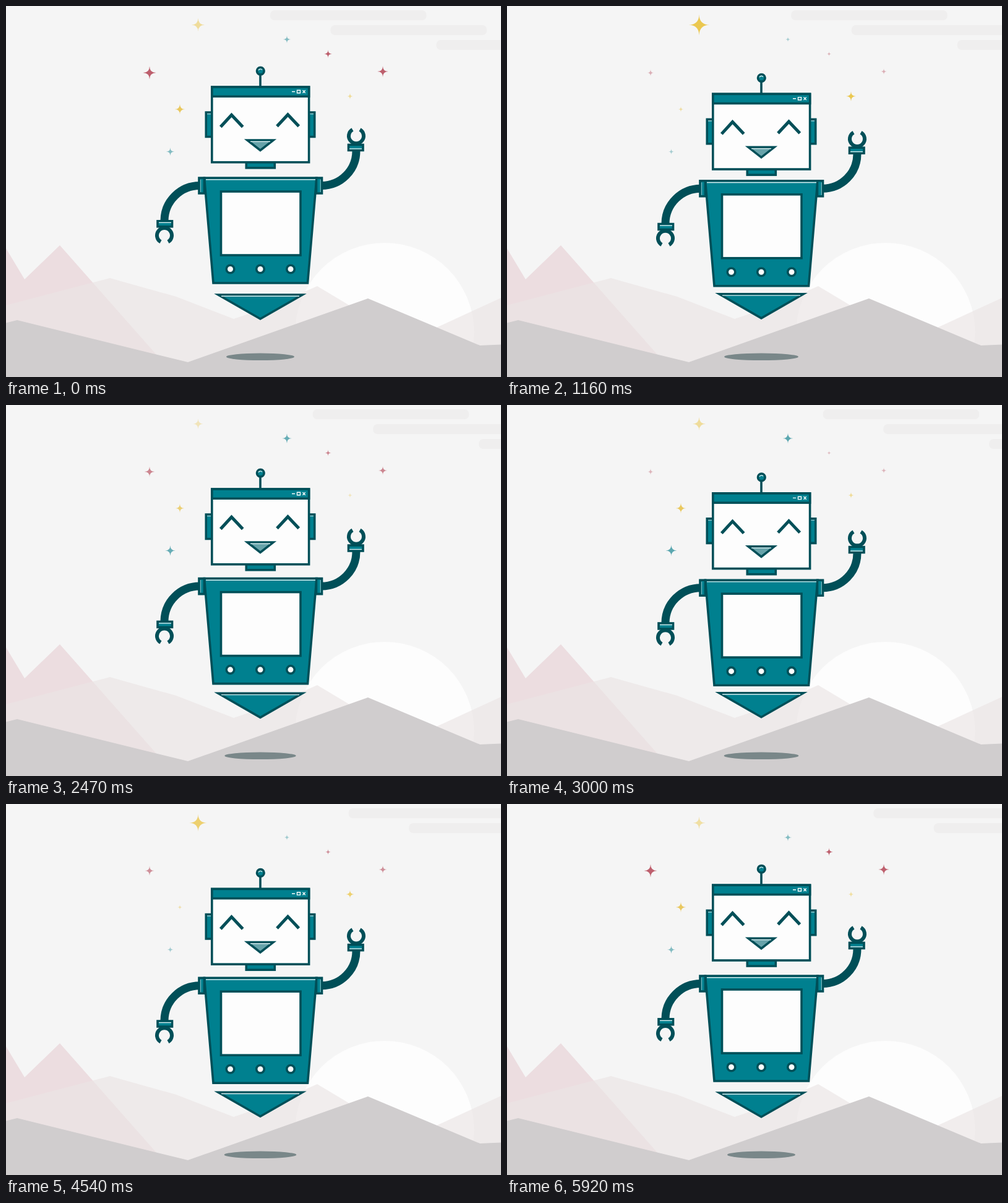
Recreate the animation shown at these times as an HTML page. Size 800x600 px, loop 6 s.

```html
<!DOCTYPE html>
<html lang="en">
<head>
<meta charset="utf-8">
<title>Happy robot</title>
<style>
  html, body { margin: 0; width: 100%; height: 100%; overflow: hidden; background: #f5f5f5; }
  svg { display: block; width: 100%; height: 100%; }
  .line { stroke: #004f58; stroke-width: 3.6; stroke-miterlimit: 10; }
  .teal { fill: #00808f; }
  .white { fill: #fdfdfd; }
  .bare { fill: none; }
  .dark { fill: #004f58; }
  .shine { fill: none; stroke: #d9eef0; stroke-width: 1.4; }
  .icon { fill: none; stroke: #fff; stroke-width: 1.4; }
</style>
</head>
<body>
<svg viewBox="0 0 800 600">
  <g id="clouds" fill="#efeeee">
    <rect x="427" y="7" width="252.500" height="16" rx="7"/>
    <rect x="524.500" y="31" width="252.500" height="16" rx="7"/>
    <rect x="695.500" y="55" width="252.500" height="16" rx="7"/>
  </g>
  <g id="stars"></g>

  <path fill="#ecdde0" d="M0 392 30 442 87 387 275 600H0Z"/>
  <circle cx="612" cy="527.500" r="144.500" fill="#fdfdfd"/>
  <path fill="#ece6e6" fill-opacity=".66" d="M0 484 168 440 275 470 368 506 435 483 503 453 650 541 698 519 800 472V600H0Z"/>
  <path fill="#d0cdce" d="M0 512.500 18 508 294 576 585 473 766 549 800 547.500V600H0Z"/>

  <ellipse id="shadow" cx="411" cy="567.300" ry="5.800" fill="#798789"/>

  <g id="tail">
    <path class="line teal" d="M343 467H479L411 506Z"/>
    <path class="shine" d="M348 469.300H474"/>
  </g>

  <g id="body">
    <g class="bare" stroke="#004f58" stroke-width="13">
      <path d="M313 290.500A57 57 0 0 0 256 347"/>
      <path d="M510 290.500A56 56 0 0 0 566 234"/>
    </g>
    <g id="hand">
      <rect class="line teal" x="245" y="347.800" width="23.500" height="9"/>
      <path class="shine" d="M247 350.300H267"/>
      <path class="bare" stroke="#004f58" stroke-width="6" d="M250 381.400A12 12 0 1 1 262 381.400"/>
    </g>
    <use href="#hand" transform="rotate(180 411 290.600)"/>
    <path class="line teal" d="M320.500 278H502L487.500 448H335Z"/>
    <path class="line teal" d="M312 278H320.500V303H312ZM501.500 278H510.500V303H501.500Z"/>
    <path class="shine" d="M323 280.700H500"/>
    <path class="shine" opacity=".5" d="M314.500 280.500V301M508.300 280.500V301"/>
    <rect class="line white" x="347.500" y="300" width="128.500" height="103"/>
    <g class="line white">
      <circle cx="362.500" cy="425.500" r="6.300"/>
      <circle cx="411" cy="425.500" r="6.300"/>
      <circle cx="460" cy="425.500" r="6.300"/>
    </g>
  </g>

  <g id="head">
    <path class="line bare" d="M411 111V131"/>
    <circle class="line teal" cx="411.300" cy="105" r="5.800"/>
    <path class="shine" d="M408 104A3.500 3.500 0 0 1 414 103.300"/>
    <path class="line teal" d="M323.300 172H333V211.500H323.300ZM489 172H498.700V211.500H489Z"/>
    <path class="shine" opacity=".7" d="M325 174.500H331M491 174.500H497"/>
    <rect class="line teal" x="388.300" y="252.500" width="46" height="9.300"/>
    <rect class="line white" x="332.800" y="131" width="156.800" height="121.700"/>
    <rect class="line teal" x="332.800" y="131" width="156.800" height="15.200"/>
    <path class="icon" d="M462 138.500H467M470.500 136.300H475.500V140.700H470.500ZM479.500 136.200 483.700 140.800M483.700 136.200 479.500 140.800"/>
    <g class="bare" stroke="#004f58" stroke-width="5">
      <path d="M346.800 195.500 364.500 176.200 382.700 195.500"/>
      <path d="M438 194.500 455.500 175.700 473.300 194.500"/>
    </g>
    <path class="line" fill="#67a3aa" d="M390 217H432L411 233.500Z"/>
    <path class="shine" d="M395 219.300H427"/>
  </g>
</svg>
<script>
const LOOP = 6000, STEP = LOOP / 78;
const get = id => document.getElementById(id);

// 1 at the peak time, 0 half a period later
const wave = (t, period, peak) => (1 + Math.cos((t - peak) / period * 2 * Math.PI)) / 2;

const RED = { color: '#bd5f6d', period: 2000, peak: 0, fade: .42 };
const GOLD = { color: '#ebc74c', period: 3000, peak: 970, fade: .35 };
const PALE = { color: '#e9c85f', period: 3000, peak: 0, fade: .5 };
const BLUE = { color: '#5ba7b0', period: 4000, peak: 2950, fade: .5 };

// x, y, smallest and largest radius
const stars = [
  [310.5, 30.5, 8.2, 17.2, GOLD],
  [556, 146, 3.9, 7.8, GOLD],
  [281, 167, 3.7, 8.2, PALE],
  [454, 54, 4, 8.3, BLUE],
  [265.5, 235.5, 4.5, 8.9, BLUE],
  [232, 108, 5, 10.6, RED],
  [520.5, 77.5, 3.3, 6.2, RED],
  [609, 106, 4.4, 8.7, RED]
].map(([x, y, min, max, style]) => {
  const node = document.createElementNS('http://www.w3.org/2000/svg', 'path');
  node.setAttribute('d', 'M0-1Q.02-.02 1 0 .02.02 0 1-.02.02-1 0-.02-.02 0-1Z');
  node.setAttribute('fill', style.color);
  get('stars').append(node);
  return { node, x, y, min, max, ...style };
});

const shift = (id, x, y) => get(id).setAttribute('transform', `translate(${x} ${y})`);

function draw(t) {
  const dip = wave(t, 2000, 960);
  const nod = wave(t, 2000, 1012);
  shift('clouds', t * .0279, 0);
  shift('body', 0, 5.2 * dip);
  shift('head', 0, 11.9 * nod);
  shift('tail', 0, -1.3 * dip);
  get('shadow').setAttribute('rx', 55 + 5.4 * dip);
  for (const s of stars) {
    const glow = wave(t, s.period, s.peak);
    const size = s.min + (s.max - s.min) * glow;
    s.node.setAttribute('transform', `translate(${s.x} ${s.y}) scale(${size})`);
    s.node.setAttribute('opacity', s.fade + (1 - s.fade) * glow);
  }
}

const start = performance.now();
function tick() {
  const t = (performance.now() - start) % LOOP;
  draw(Math.floor((t + 4) / STEP) % 78 * STEP);
  requestAnimationFrame(tick);
}
tick();
</script>
</body>
</html>
```
